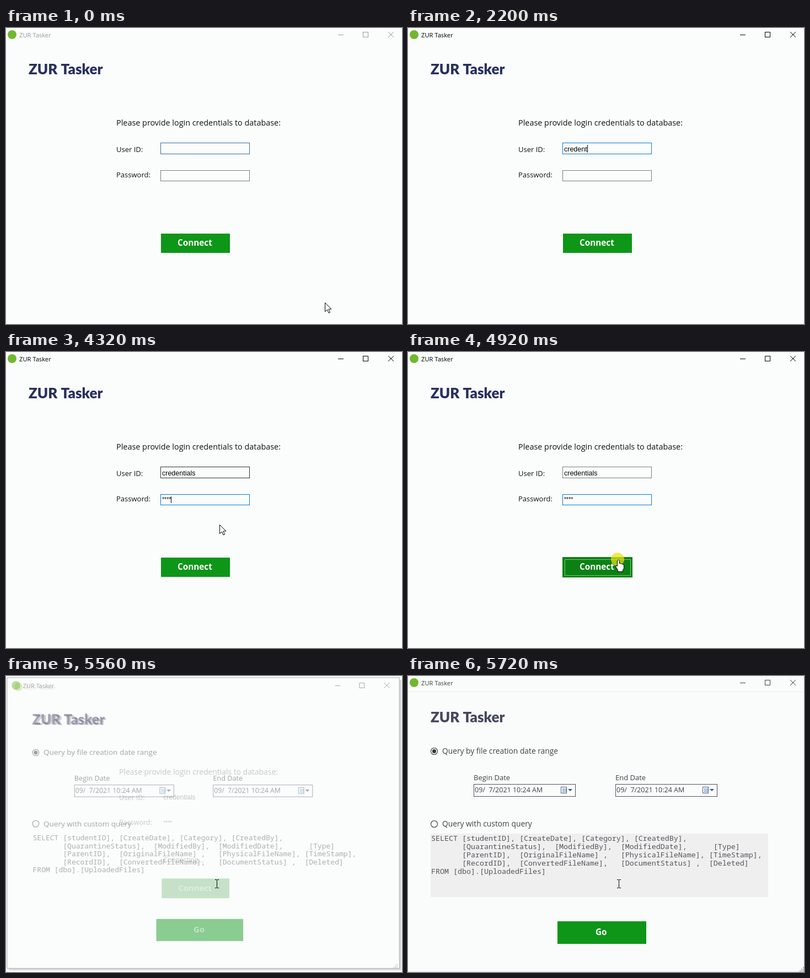
An HTML page with a canvas for the animation above (5760 ms loop, 718x537 px).

```html
<!DOCTYPE html>
<html lang="en">
<head>
<meta charset="utf-8">
<title>Login</title>
<style>
  html, body { margin: 0; width: 100%; height: 100%; overflow: hidden; background: #fbfdfc; }
  canvas { display: block; }
</style>
</head>
<body>
<canvas id="stage" width="718" height="537"></canvas>
<script>
const ctx = document.getElementById('stage').getContext('2d');
const W = 718, H = 537, LOOP = 5760, STEP = 20;
const APP = 'ZUR Tasker';
const BG = '#fbfdfc', GREEN = '#0d9618', DARK_GREEN = '#0b8114', BLUE = '#0078d7';
const GRAY = 122, HOVER = 48;
const CLOSE_START = 5420, OPEN_START = 5480;
const UI = '"Open Sans", "Noto Sans", sans-serif';
const ARIAL = '"Liberation Sans", Arial, sans-serif';
const MONO = '"Noto Sans Mono", "DejaVu Sans Mono", monospace';

// Moments at which each character appears
const USER_KEYS = [1400, 1580, 1660, 1860, 2020, 2100, 2200, 2280, 2340, 2420, 2500];
const PASS_KEYS = [3280, 3420, 3560, 3640];
const QUERY = [
  'SELECT [studentID], [CreateDate], [Category], [CreatedBy],',
  '       [QuarantineStatus],  [ModifiedBy],  [ModifiedDate],      [Type]',
  '       [ParentID],  [OriginalFileName] ,   [PhysicalFileName], [TimeStamp],',
  '       [RecordID],  [ConvertedFileName],   [DocumentStatus] ,  [Deleted]',
  'FROM [dbo].[UploadedFiles]'
];

const clamp = v => Math.max(0, Math.min(1, v));
const progress = (t, from, to) => clamp((t - from) / (to - from));
const ease = u => (u + u * u * (3 - 2 * u)) / 2;
const mix = (a, b, u) => a + (b - a) * u;
const gray = v => `rgb(${v | 0},${v | 0},${v | 0})`;
const typed = (keys, t) => keys.filter(k => k <= t).length;
const between = (t, from, to) => t >= from && t < to;

function text(str, x, y, size, color = '#111', family = UI, weight = 400) {
  ctx.font = `${weight} ${size}px ${family}`;
  ctx.fillStyle = color;
  ctx.fillText(str, x, y);
}
function rect(x, y, w, h, color) {
  ctx.fillStyle = color;
  ctx.fillRect(x, y, w, h);
}
function frame(x, y, w, h, color) {
  ctx.strokeStyle = color;
  ctx.lineWidth = 1;
  ctx.strokeRect(x + .5, y + .5, w - 1, h - 1);
}
function disc(x, y, r, color) {
  ctx.fillStyle = color;
  ctx.beginPath();
  ctx.arc(x, y, r, 0, 7);
  ctx.fill();
}
function lines(points, color) {
  ctx.strokeStyle = color;
  ctx.lineWidth = 1;
  ctx.beginPath();
  for (const [x1, y1, x2, y2] of points) {
    ctx.moveTo(x1, y1);
    ctx.lineTo(x2, y2);
  }
  ctx.stroke();
}
function scaled(scale, cx, cy, alpha, draw) {
  ctx.save();
  ctx.globalAlpha = alpha;
  ctx.translate(cx, cy);
  ctx.scale(scale, scale);
  ctx.translate(-cx, -cy);
  draw();
  ctx.restore();
}

function titleBar(color, logo, controls = true) {
  disc(11, 12, 8, '#72b72e');
  text(APP, 24, 17, 11.2, color);
  if (controls) {
    lines([[602, 12.5, 612, 12.5], [693, 7, 703, 17], [703, 7, 693, 17]], color);
    frame(647, 7, 10, 10, color);
  }
  text(APP, 41, 84, 26, logo, 'Lato, sans-serif', 900);
}

function userBorder(t) {
  if (t < 560) return '#356b99';
  if (t < 660) return gray(HOVER);
  if (t < 2820) return BLUE;
  if (t < 4020) return gray(GRAY);
  return gray(mix(HOVER, GRAY, progress(t, 4620, 4680)));
}
function passBorder(t) {
  if (t < 480) return gray(GRAY);
  if (t < 2820) return gray(mix(HOVER, GRAY, progress(t, 640, 860)));
  return t < 5000 ? BLUE : gray(GRAY);
}

function loginWindow(t) {
  const closing = t >= CLOSE_START;
  titleBar(t < 660 || closing ? '#999' : '#000', '#27305f', !closing);
  text('Please provide login credentials to database:', 200, 177, 14.4);
  text('User ID:', 200, 225, 13);
  text('Password:', 200, 271, 13);

  if (!closing) {
    frame(280, 208, 162, 21, userBorder(t));
    frame(280, 258, 162, 20, passBorder(t));
  }

  const user = 'credentials'.slice(0, typed(USER_KEYS, t));
  const pass = '*'.repeat(typed(PASS_KEYS, t));
  text(user, 283, 224, 12.5, '#000', ARIAL);
  if (between(t, 680, 1360) || between(t, 1400, 2780))
    rect(Math.round(283 + ctx.measureText(user).width), 212, 1, 14, '#000');
  text(pass, 283, 271, 10.5, '#000', ARIAL);
  if (between(t, 2820, 4640))
    rect(Math.round(283 + ctx.measureText(pass).width), 262, 1, 12, '#000');

  if (t >= 5160) text('Connecting...', 283, 342, 12.5, '#000');

  if (t >= 4920) rect(280, 372, 127, 37, DARK_GREEN);
  else rect(281, 373, 125, 35, t < 4520 ? GREEN : DARK_GREEN);
  if (between(t, 4920, 5160)) frame(284, 376, 120, 30, '#6fce76');
  text('Connect', 311, 395, 15.3, '#fff', UI, 700);
}

function radio(y, checked) {
  ctx.strokeStyle = '#333';
  ctx.lineWidth = 1.1;
  ctx.beginPath();
  ctx.arc(47.5, y, 6, 0, 7);
  ctx.stroke();
  if (checked) disc(47.5, y, 3.5, '#333');
}

function datePicker(label, x) {
  const ink = '#404048';
  text(label, x, 189, 13, ink);
  frame(x, 196, 185, 23, '#505064');
  text('09/  7/2021 10:24 AM', x + 2, 211, 12.5, ink);
  frame(x + 158, 201, 11, 12, '#56617c');
  for (let i = 0; i < 9; i++)
    rect(x + 161 + i % 3 * 2.5, 204 + (i / 3 | 0) * 2.5, 1.7, 1.7, '#5b8fc4');
  ctx.fillStyle = '#3c5578';
  ctx.beginPath();
  ctx.moveTo(x + 171, 205);
  ctx.lineTo(x + 179, 205);
  ctx.lineTo(x + 175, 209);
  ctx.fill();
}

function queryWindow(t) {
  const ink = '#404048', settled = t >= 5680;
  rect(-6, -3, 728, 540, '#fafcfb');
  if (settled) {
    rect(0, 28, W, 1, '#e9eeec');
  } else {
    rect(722, 2, 3, 538, '#aaa');
    rect(-2, 537, 724, 3, '#aaa');
  }
  frame(-6, -3, 728, 540, settled ? '#e2e6e4' : '#555');
  titleBar('#404040', '#45475e');

  radio(136.5, true);
  text('Query by file creation date range', 62, 141, 13.8, ink);
  datePicker('Begin Date', 119);
  datePicker('End Date', 376);

  radio(268.5, false);
  text('Query with custom query', 62, 273, 13.8, ink);
  if (t >= 5640) rect(41, 286, 612, 115, '#efefef');
  QUERY.forEach((row, i) => text(row, 42, 299 + i * 14.9, 13.33, '#55555c', MONO));

  rect(271, 445, 161, 41, GREEN);
  text('Go', 340, 470, 15.3, '#fff', UI, 700);
  for (let r = 0; r < 3; r++)
    for (let c = 0; c <= r; c++)
      rect(716 - c * 3, 528 + r * 3, 2, 2, '#a0a4a2');
}

function outline(points, x, y) {
  ctx.beginPath();
  for (const [px, py] of points) ctx.lineTo(x + px, y + py);
  ctx.closePath();
  ctx.fillStyle = '#fff';
  ctx.fill();
  ctx.strokeStyle = '#000';
  ctx.lineWidth = 1;
  ctx.stroke();
}
const ARROW = [[0, 0], [0, 16], [4, 12.5], [6.5, 18.5], [9, 17.5], [6.5, 11.5], [11.5, 11.5]];
const HAND = [[-1, 0], [1, 0], [2, 1], [2, 6], [5, 6.5], [8, 7.5], [10, 9], [10, 15],
  [8, 18], [8, 21], [-1, 21], [-1, 18], [-5, 12], [-4, 10], [-2, 11], [-2, 1]];

function iBeam(x, y) {
  rect(x, y - 7, 1, 14, '#000');
  for (const dy of [-8, 7]) {
    rect(x - 3, y + dy, 3, 1, '#000');
    rect(x + 1, y + dy, 3, 1, '#000');
  }
}

function pointer(t) {
  if (between(t, 1400, 4020)) return;
  const leaving = t >= 4020;
  const u = ease(leaving ? progress(t, 4020, 4540) : progress(t, 0, 580));
  const x = Math.floor(leaving ? mix(388, 381, u ** 4) : mix(578, 388, u));
  const y = Math.floor(leaving ? mix(220, 377, u) : mix(498, 220, u));

  if (between(t, 640, 840) || between(t, 4920, 5120))
    disc(x - leaving, y - leaving, 12, 'rgba(232,226,20,.72)');

  const inField = x < 442 && (between(y, 208, 229) || between(y, 258, 278));
  if (t >= OPEN_START) iBeam(382, 377);
  else if (inField) iBeam(x, y);
  else if (leaving && y >= 373) outline(HAND, x + .5, y + .5);
  else outline(ARROW, x + .5, y + .5);
}

function render(t) {
  rect(0, 0, W, H, BG);
  const closing = progress(t, CLOSE_START, 5665);
  if (closing < 1)
    scaled(1 - .06 * closing, 349, 237, 1 - closing, () => loginWindow(t));
  if (t > OPEN_START) {
    const opening = progress(t, OPEN_START, 5680);
    const alpha = progress(t, OPEN_START, 5650);
    scaled(1 - .1 * (1 - opening) ** 3, 342, 250, alpha, () => queryWindow(t));
  }
  pointer(t);
}

const start = performance.now();
function tick() {
  const t = (performance.now() - start) % LOOP;
  render(Math.floor(t / STEP) * STEP);
  requestAnimationFrame(tick);
}
tick();
</script>
</body>
</html>
```
